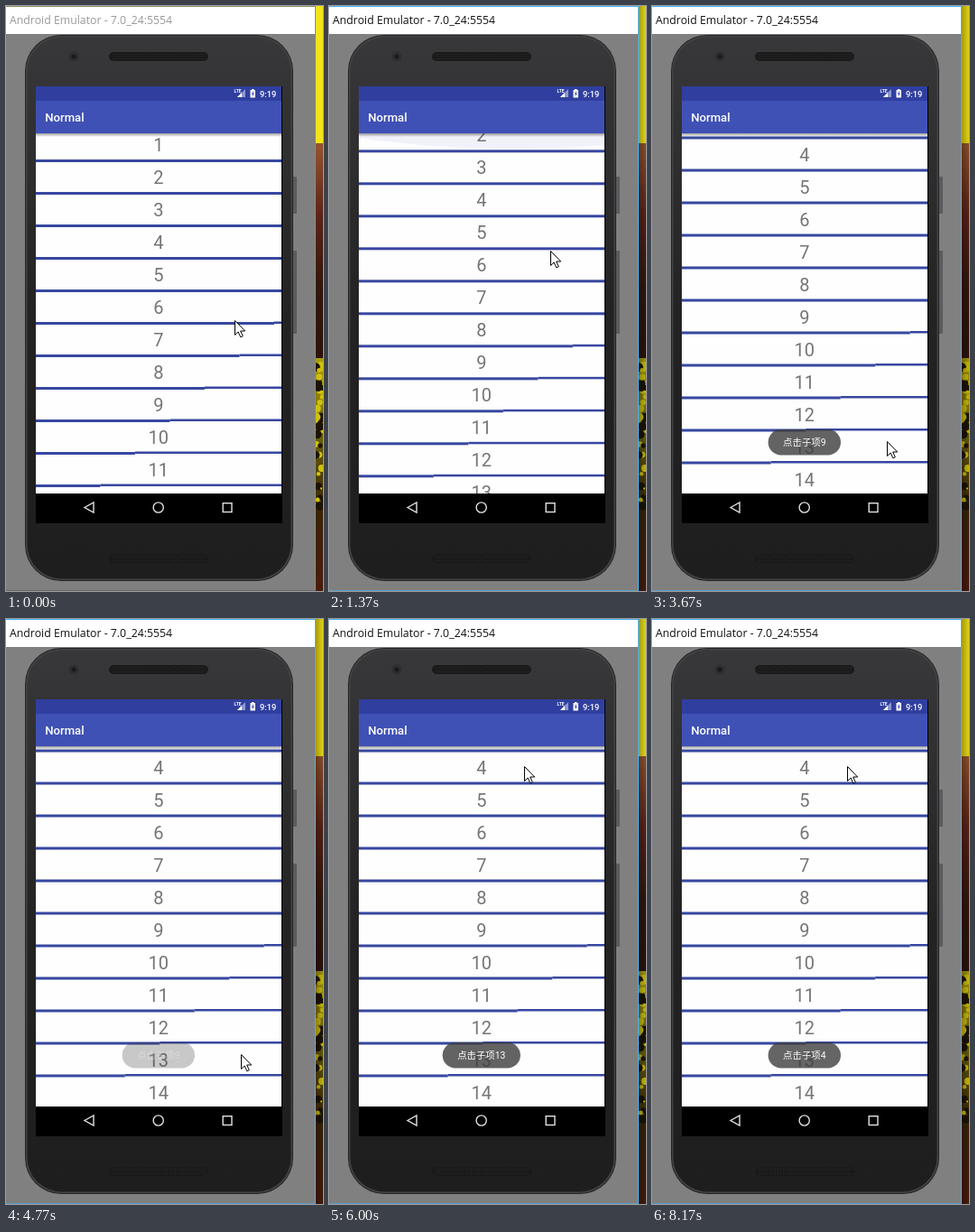
An HTML page with a canvas for the animation above (8.71 s loop, 351 px wide and 648 px high).

```html
<!DOCTYPE html>
<html lang="zh">
<head>
<meta charset="utf-8">
<style>
html, body { margin: 0; width: 100%; height: 100%; overflow: hidden; }
canvas { display: block; }
</style>
</head>
<body>
<canvas id="stage" width="351" height="648"></canvas>
<script>
const ctx = document.getElementById('stage').getContext('2d');
const LOOP = 8710, TICK = 77.27, TICK_START = 50;
const LIST = { x: 33, y: 141, w: 272, h: 399 };
const ROW = 36, ROWS = 15, CENTER = 168.8;
const TOAST_TIME = 2070, TOAST_IN = 350, TOAST_OUT = 300;
const DIVIDER = '#3747a0';

const clamp = v => Math.max(0, Math.min(1, v));
const progress = (from, until, t) => clamp((t - from) / (until - from));
const smooth = p => p * p * (3 - 2 * p);

// Runs eased moves one after another.
const follow = (start, moves, t) => moves.reduce((value, { from, until, to }) =>
  value.map((v, i) => v + (to[i] - v) * smooth(progress(from, until, t))), start);

const cursorAt = t => follow([253, 348], [
  { from: 70, until: 360, to: [243, 293] },
  { from: 430, until: 815, to: [240, 378] },
  { from: 1080, until: 1510, to: [247, 232] },
  { from: 1700, until: 1980, to: [245, 348] },
  { from: 2950, until: 3600, to: [260, 482] },
  { from: 5540, until: 6000, to: [216, 163] }
], t);

const firstRowAt = t => follow([118], [
  { from: 430, until: 740, to: [161] },
  { from: 1150, until: 1510, to: [20.5] }
], t)[0];

const glowAt = t => follow([0], [
  { from: 600, until: 815, to: [.67] },
  { from: 1200, until: 1510, to: [0] }
], t)[0];

const toasts = [{ item: 9, at: 2530 }, { item: 13, at: 5085 }, { item: 4, at: 7855 }];

function toastAlpha(age) {
  if (age >= TOAST_TIME) return .78 * (1 - progress(TOAST_TIME, TOAST_TIME + TOAST_OUT, age));
  return 1 - (1 - progress(0, TOAST_IN, age)) ** 2;
}

function rect(x, y, w, h, fill) {
  ctx.fillStyle = fill;
  ctx.fillRect(x, y, w, h);
}

function pill(x, y, w, h, r, fill) {
  ctx.beginPath();
  ctx.roundRect(x, y, w, h, r);
  ctx.fillStyle = fill;
  ctx.fill();
}

function disc(x, y, r, fill) {
  ctx.beginPath();
  ctx.arc(x, y, r, 0, 7);
  ctx.fillStyle = fill;
  ctx.fill();
}

function polygon(points, fill, stroke, width = 1) {
  ctx.beginPath();
  points.forEach(([x, y]) => ctx.lineTo(x, y));
  ctx.closePath();
  if (fill) { ctx.fillStyle = fill; ctx.fill(); }
  if (stroke) { ctx.strokeStyle = stroke; ctx.lineWidth = width; ctx.stroke(); }
}

function text(str, x, y, font, fill, align = 'left') {
  ctx.font = font;
  ctx.fillStyle = fill;
  ctx.textAlign = align;
  ctx.fillText(str, x, y);
}

function fade(x0, y0, x1, y1, ...colors) {
  const g = ctx.createLinearGradient(x0, y0, x1, y1);
  colors.forEach((color, i) => g.addColorStop(i / (colors.length - 1), color));
  return g;
}

function drawWallpaper(active) {
  rect(343, 0, 8, 152, '#f2e418');
  rect(343, 152, 8, 238, fade(0, 152, 0, 390, '#95552f', '#5c2418', '#33180c', '#2c140a'));
  rect(343, 390, 8, 258, fade(0, 390, 0, 648, '#a89c0a', '#6a600a', '#3a2408', '#4a1c0c'));
  for (let i = 0; i < 40; i++) {
    const random = n => Math.abs(Math.sin(i * 12.9 + n * 78.2) * 437.5) % 1;
    disc(343 + 8 * random(1), 392 + 165 * random(2), 1 + 5 * random(3), i % 2 ? '#1c1404' : '#cfc20c');
  }
  if (active) rect(343, 0, 8, 648, fade(343, 0, 351, 0, 'rgba(0,0,0,.32)', 'rgba(0,0,0,.08)'));
}

function drawWindow(active) {
  const edge = active ? '#45b0f0' : '#8e8e60';
  rect(0, 0, 343, 648, '#808080');
  rect(0, 0, 343, 31, '#fff');
  rect(0, 0, 343, 1, edge);
  rect(342, 0, 1, 648, edge);
  rect(0, 647, 343, 1, active ? '#5a9cc4' : '#666');
  text('Android Emulator - 7.0_24:5554', 4, 20, '12.3px "Open Sans", sans-serif', active ? '#111' : '#999');
}

function drawSpeaker(y) {
  pill(114, y, 110, 10, 5, '#1a1a1a');
  for (let row = 0; row < 3; row++)
    for (let x = 118 + row % 2 * 1.5; x < 221; x += 3) rect(x, y + 2 + row * 2.5, 1, 1, '#2c2c2c');
}

function drawPhone() {
  pill(317, 189, 5, 41, 1, '#5c5c5e');
  pill(317, 271, 5, 92, 1, '#5c5c5e');
  pill(21, 32, 297, 605, 40, '#262628');
  pill(22, 33, 295, 603, 39, '#424245');
  pill(23.5, 34.5, 292, 600, 38, fade(0, 34, 0, 636, '#38383a', '#232324', '#1e1e1e'));
  disc(75, 56, 5.5, '#2e2e30');
  disc(75, 56, 2.5, '#1a1a1c');
  drawSpeaker(51);
  drawSpeaker(607);
  rect(33, 89, 273, 484, '#000');
}

function drawStatusBar() {
  rect(33, 89, 272, 16, '#303f9f');
  polygon([[265, 92], [265, 101], [256, 101]], '#8f98cc');
  polygon([[261, 96], [261, 101], [256, 101]], '#fff');
  text('LTE', 252.5, 96, 'bold 5px Roboto, sans-serif', '#fff');
  rect(272, 92, 2.5, 1, '#fff');
  pill(270.5, 93, 5.5, 8.5, .6, '#fff');
  polygon([[274, 94], [271.8, 97.6], [273, 97.6], [272.6, 100.2], [274.8, 96.8], [273.6, 96.8]], '#303f9f');
  text('9:19', 281, 100.5, '500 9.3px Roboto, sans-serif', '#fff');
}

function drawAppBar() {
  rect(33, 105, 272, 36, '#3f51b5');
  rect(33, 141, 272, 4, fade(0, 141, 0, 145, 'rgba(0,0,0,.38)', 'rgba(0,0,0,0)'));
  text('Normal', 43.3, 128, '500 13.1px Roboto, sans-serif', '#fff');
}

function drawNavigation() {
  polygon([[87, 555.5], [97, 550], [97, 561]], null, '#e2e2e2', 1.4);
  ctx.beginPath();
  ctx.arc(168.7, 555.5, 5.6, 0, 7);
  ctx.stroke();
  ctx.strokeRect(240.2, 550.7, 9.8, 9.8);
}

function drawDivider(y) {
  // A faint seam runs along the diagonal of the screen.
  const seam = Math.min(305, 297 - 1.07 * (y - 352));
  rect(33, y - 2, seam - 33, 3, DIVIDER);
  rect(seam, y - 2.5, 305 - seam, 2.5, DIVIDER);
}

function drawList(t) {
  const { x, y, w, h } = LIST;
  const firstRow = firstRowAt(t), glow = glowAt(t);
  ctx.save();
  ctx.beginPath();
  ctx.rect(x, y, w, h);
  ctx.clip();
  rect(x, y, w, h, '#fefefe');
  for (let item = -1; item < ROWS; item++) {
    const center = firstRow + item * ROW;
    if (item >= 0) text(item, CENTER, center + 7, '20px Roboto, sans-serif', '#757575', 'center');
    drawDivider(center + ROW / 2);
  }
  if (glow > 0) {
    ctx.translate(204, y);
    ctx.scale(1, glow);
    disc(0, -353, 408, 'rgba(63,81,181,.065)');
  }
  ctx.restore();
}

function drawToast({ item, at }, t) {
  const age = t - at;
  if (age < 0 || age > TOAST_TIME + TOAST_OUT) return;
  const font = '10.4px Roboto, "Noto Sans CJK SC", "Noto Sans CJK", sans-serif';
  const label = '点击子项' + item;
  ctx.font = font;
  const w = ctx.measureText(label).width + 33;
  ctx.globalAlpha = toastAlpha(age);
  pill(CENTER - w / 2, 469, w, 28.5, 14.2, 'rgba(60,60,60,.8)');
  text(label, CENTER, 487, font, '#fff', 'center');
  ctx.globalAlpha = 1;
}

function drawCursor(t) {
  const [x, y] = cursorAt(t);
  ctx.save();
  ctx.translate(Math.round(x) + .5, Math.round(y) + .5);
  polygon([[0, 0], [0, 16], [3.7, 12.5], [6.3, 18.3], [8.8, 17.2], [6.2, 11.5], [11.2, 11.5]], '#fff', '#000');
  ctx.restore();
}

function draw(now) {
  const tick = Math.floor((now % LOOP - TICK_START) / TICK);
  const t = Math.max(0, TICK_START + tick * TICK);
  const active = t > 330;
  drawWallpaper(active);
  drawWindow(active);
  drawPhone();
  drawList(t);
  drawStatusBar();
  drawAppBar();
  drawNavigation();
  toasts.forEach(toast => drawToast(toast, t));
  drawCursor(t);
  requestAnimationFrame(draw);
}
requestAnimationFrame(draw);
</script>
</body>
</html>
```
